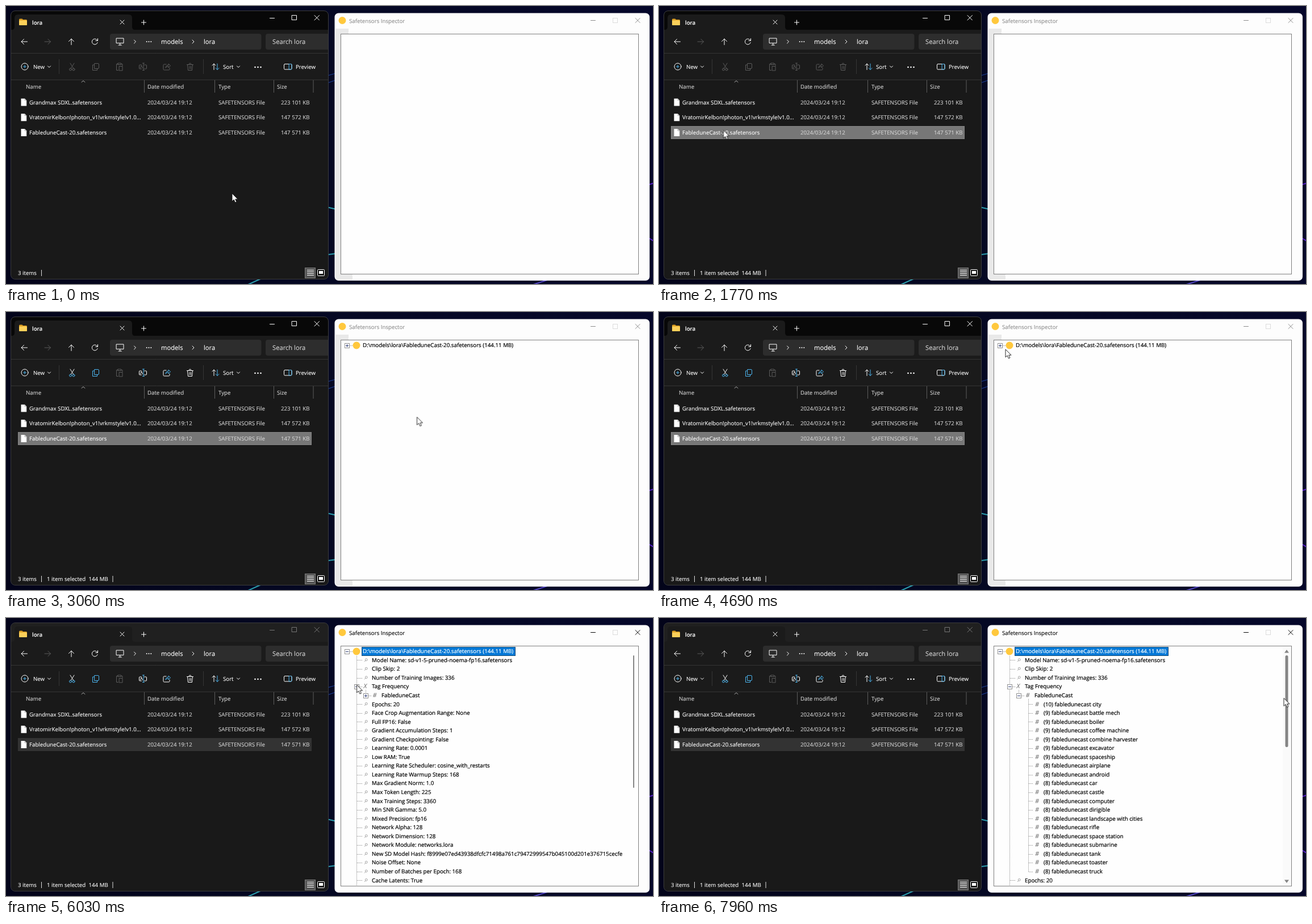
These frames come from a looping animation (1139x491 px, 7.99 s). An HTML page:

```html
<!DOCTYPE html>
<html lang="en">
<head>
<meta charset="utf-8">
<title>Safetensors Inspector</title>
<style>
html, body { margin: 0; width: 100%; height: 100%; overflow: hidden; background: #04061c; }
svg { display: block; width: 1139px; height: 491px; }
text { font: 9.7px "Open Sans", "Noto Sans", sans-serif; fill: #fff; stroke: #fff; stroke-width: .12; text-rendering: geometricPrecision; white-space: pre; }
.big { font-size: 11.2px; }
.dim { fill: #d4d4d4; stroke: #d4d4d4; }
.line { fill: none; stroke: #fff; stroke-width: 1; stroke-linecap: round; stroke-linejoin: round; }
.off { stroke: #5b5b5b; }
.blue { stroke: #4cb4ee; }
.sep { stroke: #353535; fill: none; }
.tree text { font-size: 9.75px; fill: #000; stroke: #000; stroke-width: .22; }
.tree .mark { fill: #666; stroke: none; font-size: 11px; font-style: italic; }
.tree .lit { fill: #fff; stroke: #fff; }
.grey { fill: #8c8c8c; stroke: #8c8c8c; }
.black { fill: #000; stroke: #000; }
.dots { stroke: #8c8c8c; stroke-dasharray: 1 1; fill: none; }
.box { fill: #fff; stroke: #919191; }
.sign { stroke: #34427c; }
</style>
</head>
<body>
<svg viewBox="0 0 1139 491">
  <defs>
    <linearGradient id="night">
      <stop offset="0" stop-color="#03041a"/><stop offset=".5" stop-color="#050823"/><stop offset="1" stop-color="#05072a"/>
    </linearGradient>
    <clipPath id="exClip"><rect x="9" y="9" width="558.5" height="473" rx="7"/></clipPath>
    <clipPath id="treeClip"><rect x="590" y="50" width="523" height="423"/></clipPath>
    <g id="page"><path d="M26.5-6.5h6.5l3.2 3.2V6.500h-9.700z" fill="#fff"/><path d="M33-6.500v3.200h3.200" fill="none" stroke="#999" stroke-width=".8"/></g>
    <g id="glass" fill="none" stroke="#999" stroke-width=".9"><circle cx="634.3" cy="-.8" r="1.9"/><path d="M633 .6l-2 2.200"/></g>
  </defs>

  <rect width="1139" height="491" fill="url(#night)"/>
  <g fill="none" stroke-width="2">
    <path d="M560 354L590 361M560 440L590 436M426 492L448 482" stroke="#2b9fae"/>
    <path d="M566 123L580 119M566 136L580 131" stroke="#1c3f96" stroke-width="1.2"/>
    <path d="M1130 316L1140 313M1130 409L1140 415" stroke="#5a22c8"/>
    <path d="M928 492L956 483" stroke="#5548c4"/>
  </g>

  <!-- file manager -->
  <g clip-path="url(#exClip)">
    <rect x="9" y="9" width="559" height="474" fill="#191919"/>
    <rect x="9" y="9" width="559" height="33" fill="#080808"/>
    <rect id="titleOff" x="9" y="9" width="559" height="33" fill="#202020"/>
    <rect x="9" y="42" width="559" height="88" fill="#1b1b1b"/>
    <path d="M10 42q5 0 5-5V21q0-6 6-6H216q6 0 6 6V37q0 5 5 5z" fill="#1b1b1b"/>
    <path d="M23 24q0-1.500 1.500-1.500h4l1.500 1.500h5.500q1.500 0 1.500 1.500v8H23z" fill="#dd9f22"/>
    <rect x="23" y="25.500" width="14" height="8.500" rx="1" fill="#fbd05a"/>
    <text x="46" y="32.500" style="font-weight:600">lora</text>
    <path class="line" d="M201 25l7 7m0-7l-7 7M238.500 29h8m-4-4v8"/>
    <path id="btnOn" class="line" d="M464.500 21.500h8M503.500 16.500h8v8h-8zM543 16.500l8.500 8.500m0-8.500l-8.500 8.500"/>
    <path id="btnOff" class="line" style="stroke:#777" d="M464.500 21.500h8M503.500 16.500h8v8h-8zM543 16.500l8.500 8.500m0-8.500l-8.500 8.500"/>

    <rect x="183" y="49" width="266.500" height="28" rx="4" fill="#2d2d2d"/>
    <rect x="457" y="49" width="120" height="28" rx="4" fill="#2d2d2d"/>
    <path class="line" d="M37.500 63H27m4.500-4.500L27 63l4.500 4.500M115 68.500V58m-4.500 4.500L115 58l4.500 4.500M161 61a5 5 0 1 0 .2 3.500M161.500 57.500v3.700h-3.700"/>
    <path class="line off" d="M68 63h10.500M74 58.500l4.500 4.500-4.500 4.500"/>
    <path class="line" d="M194.500 57h12.500v8.500h-12.500zM198 69h5.500m-2.800-3.500v3.500M225.500 60l3 3-3 3M328 60l3 3-3 3"/>
    <g fill="#fff"><circle cx="247.700" cy="63" r="1"/><circle cx="251.500" cy="63" r="1"/><circle cx="255.300" cy="63" r="1"/></g>
    <text class="big" x="273" y="67">models</text>
    <text class="big" x="348" y="67">lora</text>
    <text class="big dim" x="469" y="67">Search lora</text>
    <path class="sep" d="M9 83.500H568M9 130.500H568M93.500 94v26M347.500 94v26"/>

    <circle class="line" cx="33" cy="107" r="6"/>
    <path class="line blue" d="M30.500 107h5m-2.500-2.500v5"/>
    <text x="48" y="111">New</text>
    <path class="line" d="M73.500 106l2.500 2.500 2.500-2.500M406.500 106l2.500 2.500 2.500-2.500"/>
    <g id="toolsOff"></g>
    <g id="toolsOn"></g>
    <path class="line off" d="M197 102.500h-2.500v11h3M202.500 102.500h2.500v3M197 101h5.500v2.500h-5.500zM199.500 106.500h5.500v7.500h-5.500z"/>
    <path class="line" d="M366 112.500v-10.500m-3 3l3-3 3 3"/>
    <path class="line blue" d="M372 102v10.500m-3-3l3 3 3-3"/>
    <text x="382" y="111">Sort</text>
    <g fill="#fff"><circle cx="438.500" cy="108" r="1.300"/><circle cx="443.500" cy="108" r="1.300"/><circle cx="448.500" cy="108" r="1.300"/></g>
    <rect class="line" x="489.500" y="102.500" width="13.500" height="9.500" rx="1.500"/>
    <path class="line blue" d="M498.500 102.500h3q1.500 0 1.500 1.500v6.500q0 1.500-1.500 1.500h-3z"/>
    <text x="510" y="111">Preview</text>

    <path d="M243.500 131v22M367.500 131v22M471.500 131v22M541 131v22" stroke="#5c5c5c"/>
    <path class="line" style="stroke:#aaa" d="M133 134.500l3-2.500 3 2.500"/>
    <text class="dim" x="35" y="146">Name</text>
    <text class="dim" x="249" y="146">Date modified</text>
    <text class="dim" x="374" y="146">Type</text>
    <text class="dim" x="477" y="146">Size</text>

    <rect id="hover" x="21" y="212" width="517" height="23" fill="#2d2d2d"/>
    <rect id="picked" x="21.500" y="212.500" width="516" height="22" fill="#777" stroke="#858585"/>
    <rect id="pickedOff" x="21" y="212" width="517" height="23" fill="#333"/>
    <g id="files"></g>

    <text x="21" y="475">3 items</text>
    <path d="M62.500 466v11" stroke="#ddd"/>
    <g id="status">
      <text x="72" y="475">1 item selected</text><text x="145.500" y="475">144 MB</text>
      <path d="M188 466v11" stroke="#ddd"/>
    </g>
    <rect x="526.500" y="462.500" width="18" height="18" fill="#555" stroke="#7d7d7d"/>
    <path d="M530 466.500h12M530 469.500h12M530 472.500h12M530 475.500h12" stroke="#fff"/>
    <rect x="548.500" y="465.500" width="12" height="11" rx="1" fill="#111" stroke="#fff"/>
    <rect x="551" y="468" width="7" height="5" fill="#fff"/>
  </g>
  <rect x="8.500" y="8.500" width="559" height="474" rx="7.500" fill="none" stroke="#3c3c3c"/>

  <!-- inspector -->
  <rect x="578.500" y="12.500" width="554.500" height="472.500" rx="7" fill="#fdfdfd"/>
  <path id="edge" d="M580 40h23v9h-14v425h21v10H586q-6 0-6-6z" fill="#e9e9e9"/>
  <circle cx="592" cy="25.500" r="6.500" fill="#ffc83d"/>
  <g id="capOff"><text class="grey" x="604" y="29.500">Safetensors Inspector</text><path class="line" style="stroke:#8c8c8c" d="M1029.500 25.500h8M1108 21.500l8 8m0-8l-8 8"/></g>
  <g id="capOn"><text class="black" x="604" y="29.500">Safetensors Inspector</text><path class="line" style="stroke:#000" d="M1029.500 25.500h8M1108 21.500l8 8m0-8l-8 8"/></g>
  <rect x="1068.500" y="21.500" width="8" height="8" fill="none" stroke="#dcdcdc"/>
  <rect x="589.500" y="49.500" width="524" height="424" fill="#fefefe" stroke="#7f7f7f"/>
  <g class="tree" id="tree" clip-path="url(#treeClip)"></g>

  <g id="cursor">
    <path d="M0 0V14L3.200 11 5.400 16 7.900 15 5.700 10.200H10Z" fill="#fff" stroke="#111" stroke-width=".9"/>
    <g id="badge"><rect x="6.500" y="17.500" width="8.500" height="8" fill="#fff" stroke="#111"/><path d="M8.500 21.500h4.500m-2.250-2.250v4.500" stroke="#111"/></g>
  </g>
</svg>
<script>
const LOOP = 7990, NAME = 'FableduneCast', tag = NAME.toLowerCase();
const el = id => document.getElementById(id);
const css = [];
const pct = ms => (ms / LOOP * 100).toFixed(4) + '%';

// Visible from a to b (ms), with hard edges.
function show(id, a, b = LOOP) {
  const end = b < LOOP ? `${pct(b)}{opacity:0} 100%{opacity:0}` : '100%{opacity:1}';
  css.push(`@keyframes ${id}{0%{opacity:${a ? 0 : 1}} ${pct(a)}{opacity:1} ${end}}
    #${id}{animation:${id} ${LOOP}ms step-end infinite}`);
}

// Toolbar icons
const tools = (line, accent) => `
  <path class="line ${line}" d="M113 101l6 9.500M120 101l-6 9.500M238.500 104h-3q-1 0-1 1v5q0 1 1 1h3M243.500 104h3q1 0 1 1v5q0 1-1 1h-3M236.500 109.500l2-4.500 2 4.500M282 103h-3.500q-1.500 0-1.500 1.500v7q0 1.500 1.500 1.500h8q1.500 0 1.500-1.500v-2M318.500 103.500h11M322 103.500q0-2.500 2-2.500t2 2.500M319.500 103.500l1 10h7l1-10M323 106.500v4.500M325.500 106.500v4.500"/>
  <path class="line ${accent}" d="M156 101.500h6q1.500 0 1.500 1.500v6q0 1.500-1.500 1.500h-6zM155 104h-2.500v9.500h8v-2.500M242 101v12.500M240.500 101h3M240.500 113.500h3M281 109q.5-4.500 5-4.500v-2.500l3.500 3.500-3.500 3.500v-2.500q-3-.3-5 2.500"/>
  <g class="line ${accent}"><circle cx="113.500" cy="112" r="2"/><circle cx="119" cy="112" r="2"/></g>`;
el('toolsOff').innerHTML = tools('off', 'off');
el('toolsOn').innerHTML = tools('', 'blue');

// File list
el('files').innerHTML = [
  ['Grandmax SDXL.safetensors', '223 101 KB'],
  ['VratomirKelbon!photon_v1!vrkmstyle!v1.0...', '147 572 KB'],
  [NAME + '-20.safetensors', '147 571 KB']
].map(([name, size], i) => {
  const y = 170 + i * 26.8, b = y + 3.6;
  return `<use href="#page" y="${y}"/><text x="41" y="${b}">${name}</text>
    <text class="dim" x="249" y="${b}">2024/03/24 19:12</text>
    <text class="dim" x="374" y="${b}">SAFETENSORS File</text>
    <text class="dim" x="534.5" y="${b}" text-anchor="end">${size}</text>`;
}).join('');

// Tree
const rowY = i => 58.9 + 15.55 * i;
const label = (x, i, s, cls = '') => `<text x="${x}" y="${Math.round(rowY(i) + 3.3)}" class="${cls}">${s}</text>`;
const dots = (x, i, w) => `<path class="dots" d="M${x} ${Math.round(rowY(i)) + .5}h${w}"/>`;
const stem = (x, y1, y2) => `<path class="dots" d="M${x} ${y1}V${y2}"/>`;
const leaf = (s, i) => dots(618, i, 9) + `<use href="#glass" y="${rowY(i)}"/>` + label(644, i, s);
const leaves = (list, from) => list.map((s, k) => leaf(s, from + k)).join('');
function toggle(x, i, open) {
  const y = Math.round(rowY(i)) + .5;
  return `<rect class="box" x="${x - 4}" y="${y - 4}" width="8" height="8"/>
    <path class="sign" d="M${x - 2.5} ${y}h5${open ? '' : 'm-2.5-2.5v5'}"/>`;
}
const thumb = (x, w, end) => `<rect x="${x}" y="66" width="${w}" height="${end - 66}" rx="${w / 2}" fill="#858585"/>`;
const group = (id, body) => `<g id="${id}">${body}</g>`;
const path = `D:\\models\\lora\\${NAME}-20.safetensors (144.11 MB)`;

const head = ['Model Name: sd-v1-5-pruned-noema-fp16.safetensors', 'Clip Skip: 2', 'Number of Training Images: 336'];
const rest = ['Epochs: 20', 'Face Crop Augmentation Range: None', 'Full FP16: False',
  'Gradient Accumulation Steps: 1', 'Gradient Checkpointing: False', 'Learning Rate: 0.0001', 'Low RAM: True',
  'Learning Rate Scheduler: cosine_with_restarts', 'Learning Rate Warmup Steps: 168', 'Max Gradient Norm: 1.0',
  'Max Token Length: 225', 'Max Training Steps: 3360', 'Min SNR Gamma: 5.0', 'Mixed Precision: fp16',
  'Network Alpha: 128', 'Network Dimension: 128', 'Network Module: networks.lora',
  'New SD Model Hash: f8999e07ed43938dfcfc71498a761c79472999547b045100d201e376715cecfe',
  'Noise Offset: None', 'Number of Batches per Epoch: 168', 'Cache Latents: True', 'Caption Dropout Rate: 0.0'];
const counts = [
  [10, 'city'],
  [9, 'battle mech,boiler,coffee machine,combine harvester,excavator,spaceship'],
  [8, 'airplane,android,car,castle,computer,dirigible,landscape with cities,rifle,space station,submarine,tank,toaster,truck']
].flatMap(([n, words]) => words.split(',').map(w => `(${n}) ${tag} ${w}`));

const child = open => stem(633.5, 127, 133) + dots(638, 5, 6) + toggle(633.5, 5, open) +
  label(645.5, 5, '#', 'mark') + label(661, 5, NAME);
const tags = stem(650.5, 143, 448) + counts.map((s, k) =>
  dots(651, 6 + k, 8) + label(662, 6 + k, '#', 'mark') + label(677, 6 + k, s)).join('');

el('tree').innerHTML =
  group('root', dots(605, 0, 6) + '<circle cx="617" cy="59" r="6.5" fill="#ffc83d"/>' + label(628, 0, path)) +
  group('rootShut', toggle(600.5, 0, false)) +
  group('opened', toggle(600.5, 0, true) +
    `<rect x="626" y="51" width="271" height="16" fill="#0078d7"/>
     <rect x="626.5" y="51.5" width="270" height="15" fill="none" stroke="#2b2213" stroke-dasharray="1 1"/>` +
    label(628, 0, path, 'lit') + stem(617.5, 67, 473) + leaves(head, 1) +
    dots(622, 4, 5) + label(629.5, 4, 'X', 'mark') + label(644, 4, 'Tag Frequency')) +
  group('tagShut', toggle(617.5, 4, false) + leaves(rest, 5) + thumb(1104, 2, 305)) +
  group('tagOpen', toggle(617.5, 4, true)) +
  group('childShut', child(false) + leaves(rest, 6) + thumb(1104, 2, 300)) +
  group('childOpen', child(true) + tags + leaves(rest.slice(0, 1), 26)) +
  group('barThin', thumb(1104, 2, 228)) +
  group('barWide', '<rect x="1098" y="51" width="15" height="421" fill="#fafafa"/>' + thumb(1102.5, 5, 228) +
    '<path d="M1101 61.500h8l-4-5.500zM1101 462.500h8l-4 5.500z" fill="#858585"/>');

show('hover', 1200, 1770);
show('picked', 1770, 5110);
show('pickedOff', 5110);
show('status', 1770);
show('toolsOff', 0, 1800);
show('toolsOn', 1800);
show('badge', 2240, 2850);
show('root', 2950);
show('rootShut', 2950, 5140);
['titleOff', 'btnOff', 'capOn'].forEach(id => show(id, 5110));
['btnOn', 'capOff', 'edge'].forEach(id => show(id, 0, 5110));
show('opened', 5140);
show('tagShut', 5140, 6030);
show('tagOpen', 6030);
show('childShut', 6030, 7090);
show('childOpen', 7090);
show('barThin', 7090, 7900);
show('barWide', 7900);

// Pointer: [ms, x, y, linear segment]
const stops = [
  [0, 398, 331], [760, 398, 331], [1380, 113.5, 219.5], [2210, 113.5, 219.5, 1],
  [2270, 165, 248, 1], [2330, 285, 282, 1], [2390, 425, 293, 1], [2450, 579, 262, 1], [2500, 680, 208, 1],
  [2540, 723.5, 185.5], [3460, 723.5, 185.5], [4130, 653, 130], [4290, 653, 130], [4910, 602, 54],
  [5420, 602, 54], [5750, 617.5, 118], [6530, 617.5, 118], [6900, 635.5, 144], [7400, 635.5, 144],
  [7960, 1100, 141.5], [LOOP, 1100, 141.5]
];
css.push(`@keyframes move{${stops.map(([t, x, y, lin]) =>
  `${pct(t)}{transform:translate(${x}px,${y}px);animation-timing-function:${lin ? 'linear' : 'cubic-bezier(.4,0,.4,1)'}}`).join('')}}
  #cursor{animation:move ${LOOP}ms infinite}`);

const sheet = document.createElement('style');
sheet.textContent = css.join('\n');
document.head.append(sheet);
</script>
</body>
</html>
```
